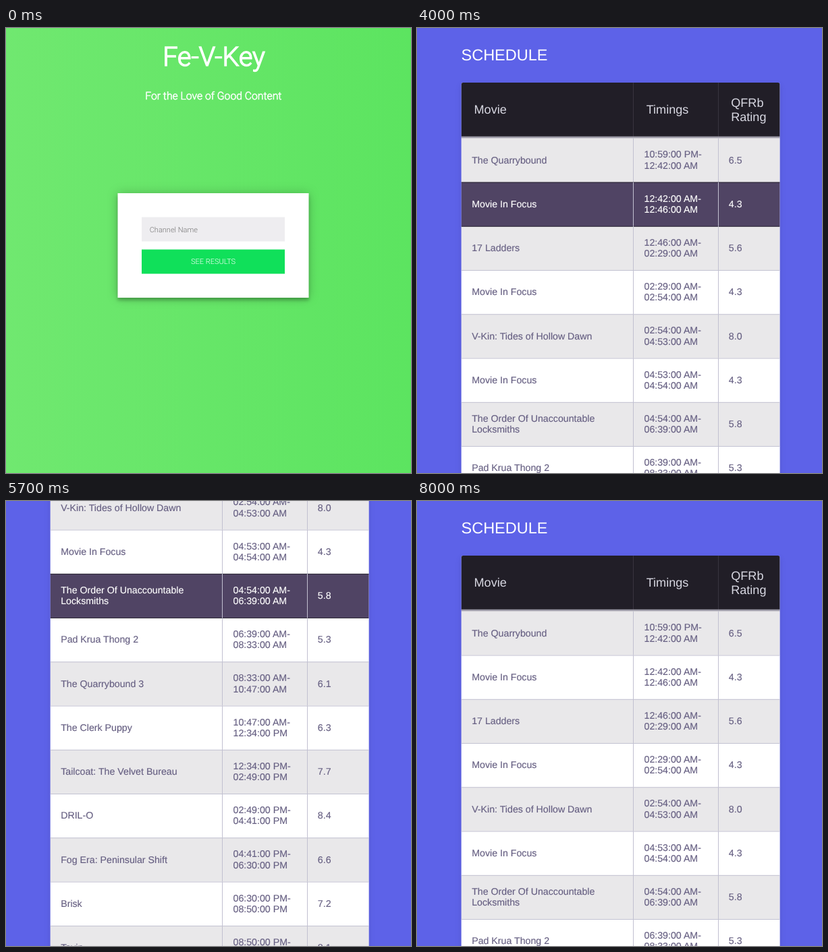
Animation, 600 px wide and 660 px high, one loop 8500 ms. Source, as an HTML page:

```html
<!DOCTYPE html>
<html lang="en">
<head>
<meta charset="utf-8">
<title>Channel schedule</title>
<style>
  html, body { margin: 0; width: 100%; height: 100%; overflow: hidden; background: #5d62e8; }
  svg { display: block; width: 600px; height: 660px; text-rendering: geometricPrecision; }

  #search { font: 300 11.02px Roboto, sans-serif; }
  .heading { fill: #fff; stroke: #fff; text-anchor: middle; }
  .card { fill: #fff; filter: drop-shadow(0 0 7.9px rgba(0,0,0,.2)) drop-shadow(0 4px 2px rgba(0,0,0,.24)); }
  .typed { fill: #222; }
  .placeholder { fill: #757575; }

  #schedule { font: 14.2px "Liberation Sans", Arial, sans-serif; }
  .head text { font-size: 18.1px; fill: #d8d8e2; }
  .table { fill: #fff; filter: drop-shadow(0 4px 4px rgba(0,0,0,.1)); }
  .row rect { fill: #fff; }
  .row:nth-child(odd) rect { fill: #e9e8ea; }
  .row text { fill: #665f82; stroke: #665f82; stroke-width: .15; }
  .row line { stroke: #c1c0d0; }
  .row.hover rect { fill: #504464; }
  .row.hover text { fill: #fff; stroke: #fff; }
  .row.hover .edge, .row.hover + .row .edge { stroke: #24202e; }
</style>
</head>
<body>
<svg viewBox="0 0 600 660">
  <defs>
    <linearGradient id="green">
      <stop stop-color="#70e870"/>
      <stop offset="1" stop-color="#5ce460"/>
    </linearGradient>
  </defs>

  <g id="search">
    <rect width="600" height="660" fill="url(#green)"/>
    <text class="heading" x="308" y="55.6" font-size="39.4" stroke-width="1.5">Fe-V-Key</text>
    <text class="heading" x="307.3" y="106" font-size="15.74" stroke-width=".6">For the Love of Good Content</text>
    <rect class="card" x="165.5" y="245" width="283" height="155"/>
    <rect id="field" x="201" y="280.5" width="212" height="36"/>
    <text id="entry" x="212.7" y="302.5"></text>
    <path id="spelling" d="M273 304.5h15" stroke="#e0544c" stroke-dasharray="1.5 .8"/>
    <rect id="button" x="201" y="328.5" width="212" height="36"/>
    <text x="307" y="350.3" fill="#fff" text-anchor="middle">SEE RESULTS</text>
  </g>

  <g id="schedule">
    <rect width="600" height="660" fill="#5d62e8"/>
    <g id="page">
      <text x="65.5" y="48" font-size="23.5" fill="#fff">SCHEDULE</text>
      <rect class="table" x="65.8" y="81" width="471.6" height="1061" rx="2.4"/>
      <g class="head">
        <path d="M65.8 161V83.4a2.4 2.4 0 0 1 2.4-2.4H535a2.4 2.4 0 0 1 2.4 2.4V161z" fill="#211e27"/>
        <path d="M320.5 81v80M446.5 81v80" stroke="#38343f"/>
        <rect x="65.8" y="160.7" width="471.6" height="3" fill="#9e9ca8"/>
        <text x="84.5" y="126.8">Movie</text>
        <text x="339.7" y="126.8">Timings</text>
        <text x="465.2" y="116.8">QFRb</text>
        <text x="465.2" y="137.8">Rating</text>
      </g>
      <g id="rows"></g>
    </g>
  </g>
</svg>

<script>
const LOOP = 8500, STEP = 100, OPEN_SCHEDULE = 3000;
const ROW_TOP = 163.5, ROW_HEIGHT = 65.25;
const CHANNEL = "Kite Movies HD";

// Title (| breaks the line), start time, rating
const programme = [
  ["The Quarrybound", "22:59", "6.5"],
  ["Movie In Focus", "00:42", "4.3"],
  ["17 Ladders", "00:46", "5.6"],
  ["Movie In Focus", "02:29", "4.3"],
  ["V-Kin: Tides of Hollow Dawn", "02:54", "8.0"],
  ["Movie In Focus", "04:53", "4.3"],
  ["The Order Of Unaccountable|Locksmiths", "04:54", "5.8"],
  ["Pad Krua Thong 2", "06:39", "5.3"],
  ["The Quarrybound 3", "08:33", "6.1"],
  ["The Clerk Puppy", "10:47", "6.3"],
  ["Tailcoat: The Velvet Bureau", "12:34", "7.7"],
  ["DRIL-O", "14:49", "8.4"],
  ["Fog Era: Peninsular Shift", "16:41", "6.6"],
  ["Brisk", "18:30", "7.2"],
  ["Tavin", "20:50", "8.1"]
];
const CLOSING = "23:07";

// Time and value pairs, joined by straight lines
const scrollPath = [[4100, 0], [5000, 217.7], [5700, 447], [6200, 447], [6700, 0]];
const pointerPath = [[4000, 260], [5000, 304], [5700, 140]];

const $ = id => document.getElementById(id);

function clock(time) {
  const [hour, minute] = time.split(":");
  const h = String(hour % 12 || 12).padStart(2, "0");
  return `${h}:${minute}:00 ${hour < 12 ? "AM" : "PM"}`;
}

function cell(x, lines) {
  const first = lines.length > 1 ? 28.8 : 37;
  return lines.map((s, i) => `<text x="${x}" y="${first + i * 16.3}">${s}</text>`).join("");
}

function rowMarkup([title, start, rating], i) {
  const end = programme[i + 1]?.[1] ?? CLOSING;
  return `<g class="row" transform="translate(0 ${ROW_TOP + i * ROW_HEIGHT})">
    <rect x="65.8" width="471.6" height="${ROW_HEIGHT}"/>
    ${i ? '<line class="edge" x1="65.8" x2="537.4" y1=".3" y2=".3"/>' : ""}
    <line x1="320.5" x2="320.5" y2="${ROW_HEIGHT}"/>
    <line x1="446.5" x2="446.5" y2="${ROW_HEIGHT}"/>
    ${cell(81.2, title.split("|"))}
    ${cell(336.5, [clock(start) + "-", clock(end)])}
    ${cell(461.8, [rating])}
  </g>`;
}

function along(path, t) {
  if (t <= path[0][0]) return path[0][1];
  const next = path.findIndex(([time]) => time >= t);
  if (next < 0) return path[path.length - 1][1];
  const [t0, v0] = path[next - 1], [t1, v1] = path[next];
  return v0 + (v1 - v0) * (t - t0) / (t1 - t0);
}

$("rows").innerHTML = programme.map(rowMarkup).join("");
const rows = [...$("rows").children];

function drawSearch(t) {
  const count = Math.max(0, Math.min(CHANNEL.length, Math.floor((t - 200) / STEP)));
  const done = t >= 1700;
  $("entry").textContent = count ? CHANNEL.slice(0, count) : "Channel Name";
  $("entry").setAttribute("class", count ? "typed" : "placeholder");
  $("field").setAttribute("fill", done ? "#e7e7fd" : "#eeedf0");
  $("spelling").style.display = done ? "" : "none";
  $("button").setAttribute("fill", t >= 1800 ? "#10ce50" : "#10e05a");
}

function drawSchedule(t) {
  const scroll = along(scrollPath, t);
  const hovered = t < 4000 ? -1
    : Math.floor((along(pointerPath, t) + scroll - ROW_TOP) / ROW_HEIGHT);
  $("page").setAttribute("transform", `translate(0 ${-scroll})`);
  rows.forEach((row, i) => row.classList.toggle("hover", i === hovered));
}

function draw(now) {
  const t = Math.floor((now % LOOP) / STEP) * STEP;
  const searching = t < OPEN_SCHEDULE;
  $("search").style.display = searching ? "" : "none";
  $("schedule").style.display = searching ? "none" : "";
  (searching ? drawSearch : drawSchedule)(t);
}

let origin;
function tick(now) {
  origin ??= now;
  draw(now - origin);
  requestAnimationFrame(tick);
}
draw(0);
requestAnimationFrame(tick);
</script>
</body>
</html>
```
